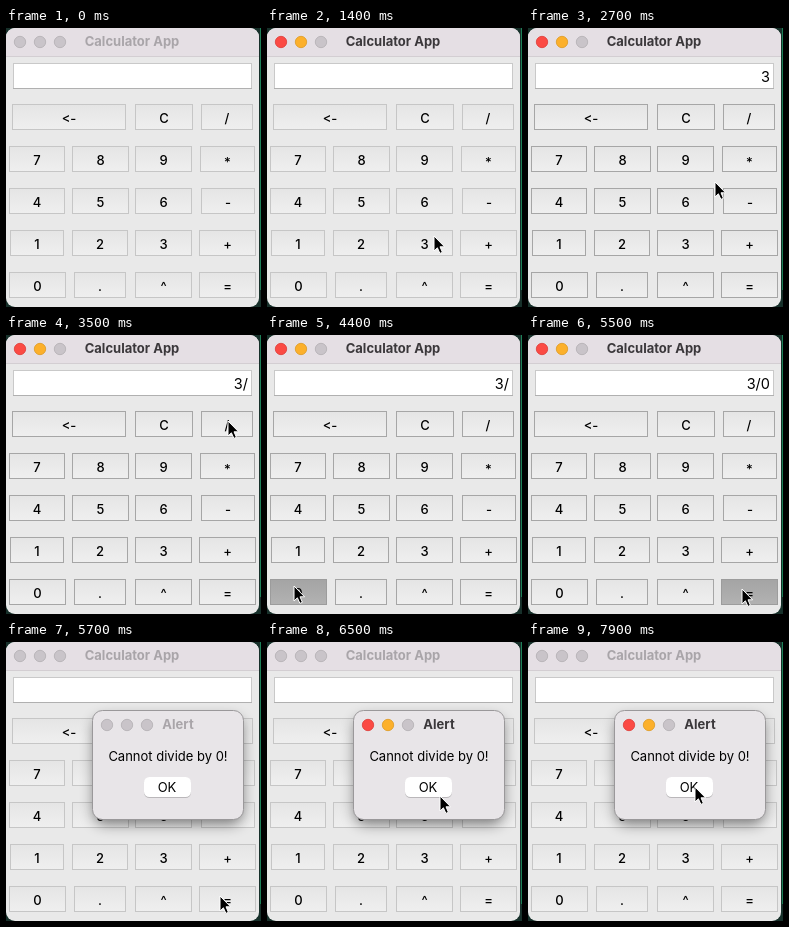
Write an HTML page that moves like this. It is 255 px wide and 279 px high and loops after 8 s.

```html
<!DOCTYPE html>
<html>
<head>
<meta charset="utf-8">
<style>
html, body { margin: 0; width: 100%; height: 100%; overflow: hidden; background: #17302a; }
svg { display: block; width: 255px; height: 279px; }
text { font: 13px Inter, "Liberation Sans", sans-serif; text-anchor: middle; font-variant-ligatures: none; font-feature-settings: "calt" 0; }
.key text { font-weight: 500; }
.title { font-weight: 700; fill: #a9a5a9; }
.on .title { fill: #3b383b; }
.light { fill: #c9c4c9; stroke: #b3afb3; stroke-width: .8; }
.on .red { fill: #fb4a44; stroke: #de3a36; }
.on .amber { fill: #fcb02b; stroke: #dd9a22; }
.key rect { fill: url(#face); stroke: #c6c6c6; }
.dark .key rect { stroke: #a6a6a6; }
.key.down rect { fill: url(#pressed); stroke: #9c9c9c; }
#value { font-size: 14.5px; text-anchor: end; }
</style>
</head>
<body>
<svg viewBox="0 0 255 279">
  <defs>
    <linearGradient id="face" x2="0" y2="1"><stop stop-color="#e5e5e5"/><stop offset="1" stop-color="#efefef"/></linearGradient>
    <linearGradient id="pressed" x2="0" y2="1"><stop stop-color="#a4a4a4"/><stop offset="1" stop-color="#b2b2b2"/></linearGradient>
    <clipPath id="frame"><rect width="253" height="279" rx="9"/></clipPath>
    <filter id="blur" x="-30%" y="-30%" width="160%" height="160%"><feGaussianBlur stdDeviation="7"/></filter>
  </defs>
  <path d="M254.5 0V262" stroke="#1d8058"/>
  <g id="main">
    <g clip-path="url(#frame)">
      <rect width="253" height="279" fill="#e9e9e9"/>
      <rect width="253" height="28" fill="#e5dfe4"/>
      <path d="M0 28.5H253" stroke="#d3ced2"/>
    </g>
    <text class="title" x="126" y="18">Calculator App</text>
    <rect x="7.5" y="35.5" width="238" height="25" fill="#fff" stroke="#c9c9c9"/>
    <path d="M7 60.5H246" stroke="#b0b0b0"/>
    <text id="value" x="242" y="54"></text>
  </g>
  <g id="alert">
    <rect x="88" y="76" width="148" height="106" rx="10" opacity=".5" filter="url(#blur)"/>
    <rect x="86.5" y="68.5" width="151" height="109" rx="10" fill="#e8e5e8" stroke="#9a989a"/>
    <text class="title" x="172" y="87">Alert</text>
    <text x="162" y="119">Cannot divide by 0!</text>
    <rect x="138" y="136" width="47" height="20" rx="5.5" opacity=".2"/>
    <rect x="138" y="135" width="47" height="20" rx="5.5" fill="#fff"/>
    <text x="161" y="149.5">OK</text>
  </g>
  <path id="cursor" d="M0 0V15L3.4 11.8 5.9 17.4 8.4 16.3 6 10.8H10.6Z" stroke="#fff"/>
</svg>
<script>
const $ = id => document.getElementById(id);
const main = $('main'), alertBox = $('alert'), cursor = $('cursor'), value = $('value');

function add(parent, tag, attrs, text = '') {
  const el = document.createElementNS('http://www.w3.org/2000/svg', tag);
  for (const name in attrs) el.setAttribute(name, attrs[name]);
  el.textContent = text;
  return parent.appendChild(el);
}

function lights(parent, x, y) {
  ['red', 'amber', ''].forEach((name, i) =>
    add(parent, 'circle', { class: 'light ' + name, cx: x + 20 * i, cy: y, r: 5.7 }));
}
lights(main, 14, 14);
lights(alertBox, 101, 83);

// Each row: top, then label, left, right for every key
const rows = [
  [76, '<-', 6, 120, 'C', 129, 187, '/', 195, 247],
  [118, '7', 3, 59, '8', 66, 123, '9', 129, 186, '*', 194, 249],
  [160, '4', 3, 59, '5', 66, 123, '6', 129, 186, '-', 195, 249],
  [202, '1', 4, 58, '2', 66, 122, '3', 129, 186, '+', 193, 250],
  [244, '0', 3, 60, '.', 68, 120, '^', 129, 186, '=', 193, 250]
];
const keys = {};
for (const [top, ...cells] of rows)
  for (let i = 0; i < cells.length; i += 3) {
    const [label, left, right] = cells.slice(i, i + 3);
    const key = keys[label] = add(main, 'g', { class: 'key' });
    add(key, 'rect', { x: left + .5, y: top + .5, width: right - left - 1, height: 25 });
    add(key, 'text', { x: (left + right) / 2, y: top + (label === '*' ? 21 : 19) }, label);
  }

// Pointer path: time, x, y
const path = [
  [500, 194, 200], [600, 189, 200], [800, 189, 200], [1300, 167, 208],
  [2600, 167, 208], [2700, 187, 154], [3200, 221, 92], [3300, 222, 86],
  [3500, 222, 86], [4300, 27, 251], [4600, 27, 251], [4950, 120, 238],
  [5300, 214, 254], [6200, 214, 254], [6300, 205, 235], [6400, 188, 190],
  [6500, 173, 154], [6700, 166, 148], [6900, 166, 148], [7000, 167, 145], [8000, 167, 145]
];
// Key presses: label, from, until
const presses = [['3', 2300, 2400], ['/', 3400, 3500], ['0', 4400, 4500], ['=', 5500, 5700]];

function draw(now) {
  const t = Math.floor(now % 8000 / 100) * 100;
  const during = (from, to) => t >= from && t < to;

  main.classList.toggle('on', during(1300, 5700));
  main.classList.toggle('dark', during(1500, 5700));
  alertBox.classList.toggle('on', t >= 5900);
  alertBox.style.display = t >= 5700 ? '' : 'none';

  let typed = '';
  for (const [label, from, to] of presses) {
    keys[label].classList.toggle('down', during(from, to));
    if (label !== '=' && t >= to) typed += label;
  }
  value.textContent = t < 5700 ? typed : '';

  cursor.style.display = t >= 500 ? '' : 'none';
  const i = path.findIndex(p => p[0] > t);
  if (i > 0) {
    const [a, ax, ay] = path[i - 1], [b, bx, by] = path[i], k = (t - a) / (b - a);
    cursor.setAttribute('transform', `translate(${ax + (bx - ax) * k} ${ay + (by - ay) * k})`);
  }
  requestAnimationFrame(draw);
}

const start = performance.now();
requestAnimationFrame(function tick() {
  draw = (inner => now => inner(Math.max(0, now - start)))(draw);
  draw(performance.now());
});
</script>
</body>
</html>
```
